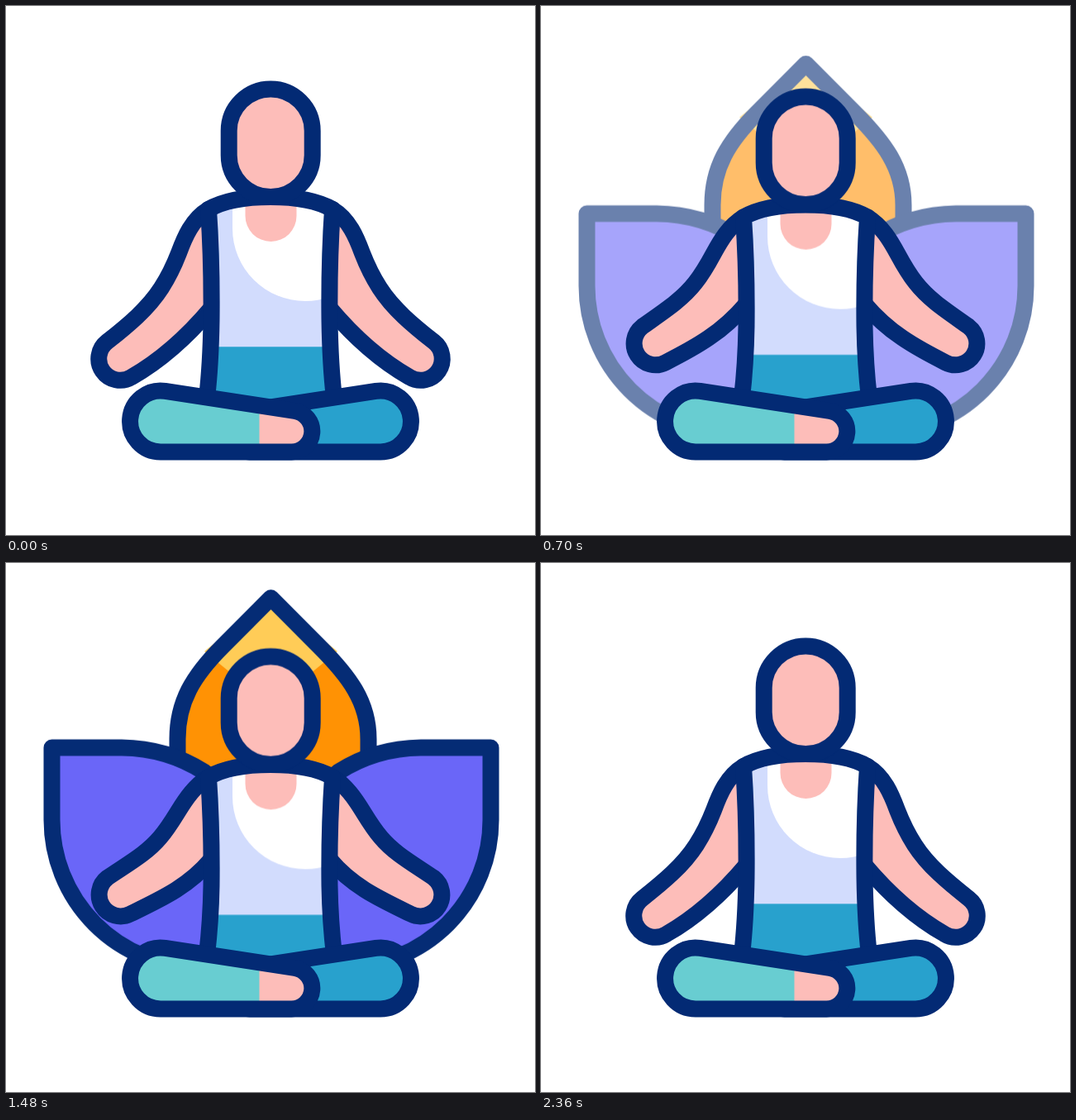
An HTML page for the animation above (2.4 s loop, 640 by 640 pixels).

```html
<!DOCTYPE html>
<html lang="en">
<head>
<meta charset="utf-8">
<title>Meditation</title>
<style>
  html, body { margin: 0; width: 100%; height: 100%; overflow: hidden; background: #fff; }
  svg { display: block; width: 100vw; height: 100vh; }

  .line { stroke: #032a74; stroke-width: 20; stroke-linejoin: round; stroke-linecap: round; }
  .skin { fill: #fdbdb9; }
  .shirt { fill: #d2dcfd; }
  .pants { fill: #28a1cd; }
  .shin { fill: #68cdd1; }
  .white { fill: #fff; }
  .orange { fill: #ff9102; }
  .yellow { fill: #ffcc55; }
  .violet { fill: #6965f8; }
  .none { fill: none; }

  /* breathing: 1.2 s out, 1.2 s back */
  .head, .chest, .torso, .arm {
    animation: 1.2s cubic-bezier(.364, 0, .636, 1) infinite alternate;
  }
  .head { animation-name: head; }
  .chest { animation-name: chest; }
  .torso { animation-name: torso; }
  .arm { animation-name: arm; }
  .lotus { animation: rise 2.4s linear infinite, fade 2.4s infinite; }

  @keyframes head { to { transform: translateY(14.5px); } }
  @keyframes chest { to { transform: translateY(15.3px); } }
  @keyframes torso {
    from { d: path("M243 474C247 440 248 412 248.5 380C249 335 248 290 245 246C264 235 290 231 320 231C350 231 376 235 395 246C392 290 391 335 391.5 380C392 412 393 440 397 474"); }
    to { d: path("M243 474C247 440 248 420 248.5 392C249 350 248 305 245 261C264 250 290 246 320 246C350 246 376 250 395 261C392 305 391 350 391.5 392C392 420 393 440 397 474"); }
  }
  @keyframes arm {
    from { d: path("M245 246C225 258 216 280 209 299C202 317 197 327 188 341C172 366 148 386 122.4 406.2A26 26 0 0 0 151.8 449C185 430 216 404 248 366"); }
    to { d: path("M245 261C229 271 218 286 208 301C200 313 195 321 186 331C170 349 150 359 122.8 377A26 26 0 0 0 150 421C190 402 222 389 248 358"); }
  }
  @keyframes rise {
    from { transform: translateY(45.7px); }
    to { transform: translateY(-40px); }
  }
  @keyframes fade {
    0%, 10% { opacity: 0; animation-timing-function: cubic-bezier(.333, 0, .667, 1); }
    44.2% { opacity: 1; }
    60% { opacity: 1; animation-timing-function: cubic-bezier(.333, 0, .667, 1); }
    87.5%, 100% { opacity: 0; }
  }
</style>
</head>
<body>
<svg viewBox="0 0 640 640">
  <defs>
    <path id="petal" d="M55.5 230.5H140C178 231 212 242 240 260L321 330V496H233A178 178 0 0 1 55.5 318Z"/>
    <path id="leg" d="M187 539.5H345.5A25 25 0 0 0 349.2 489.8L192.5 465.9A37 37 0 1 0 187 539.5Z"/>
    <path id="bud" d="M321 330L207.5 262V220C207.5 175 226 144 262 108L320.5 49.3L379 108C415 144 438.5 175 438.5 220V262Z"/>
  </defs>

  <g class="lotus">
    <use href="#bud" class="orange"/>
    <path class="yellow" d="M320.5 49L240 114L320.5 180L401 114Z"/>
    <use href="#bud" class="line none"/>
    <use href="#petal" class="line violet"/>
    <use href="#petal" class="line violet" transform="matrix(-1 0 0 1 642 0)"/>
  </g>

  <path class="arm line skin"/>
  <g transform="matrix(-1 0 0 1 640 0)"><path class="arm line skin"/></g>

  <path class="torso shirt"/>
  <g class="chest">
    <path class="white" d="M274 240L320 233L391 244V352Q378 357 362 357A88 88 0 0 1 274 269Z"/>
    <path class="skin" d="M289.5 236H351.5V254A31 31 0 0 1 289.5 254Z"/>
    <rect class="pants" x="246" y="412.3" width="148" height="66"/>
  </g>
  <path class="torso line none"/>

  <rect class="head line skin" x="269.7" y="100.5" width="101" height="130.5" rx="50.5"/>

  <use href="#leg" class="line pants" transform="matrix(-1 0 0 1 640 0)"/>
  <use href="#leg" class="shin"/>
  <path class="skin" d="M306.5 483.3L349.2 489.8A25 25 0 0 1 345.5 539.5H306.5Z"/>
  <use href="#leg" class="line none"/>
</svg>
</body>
</html>
```
